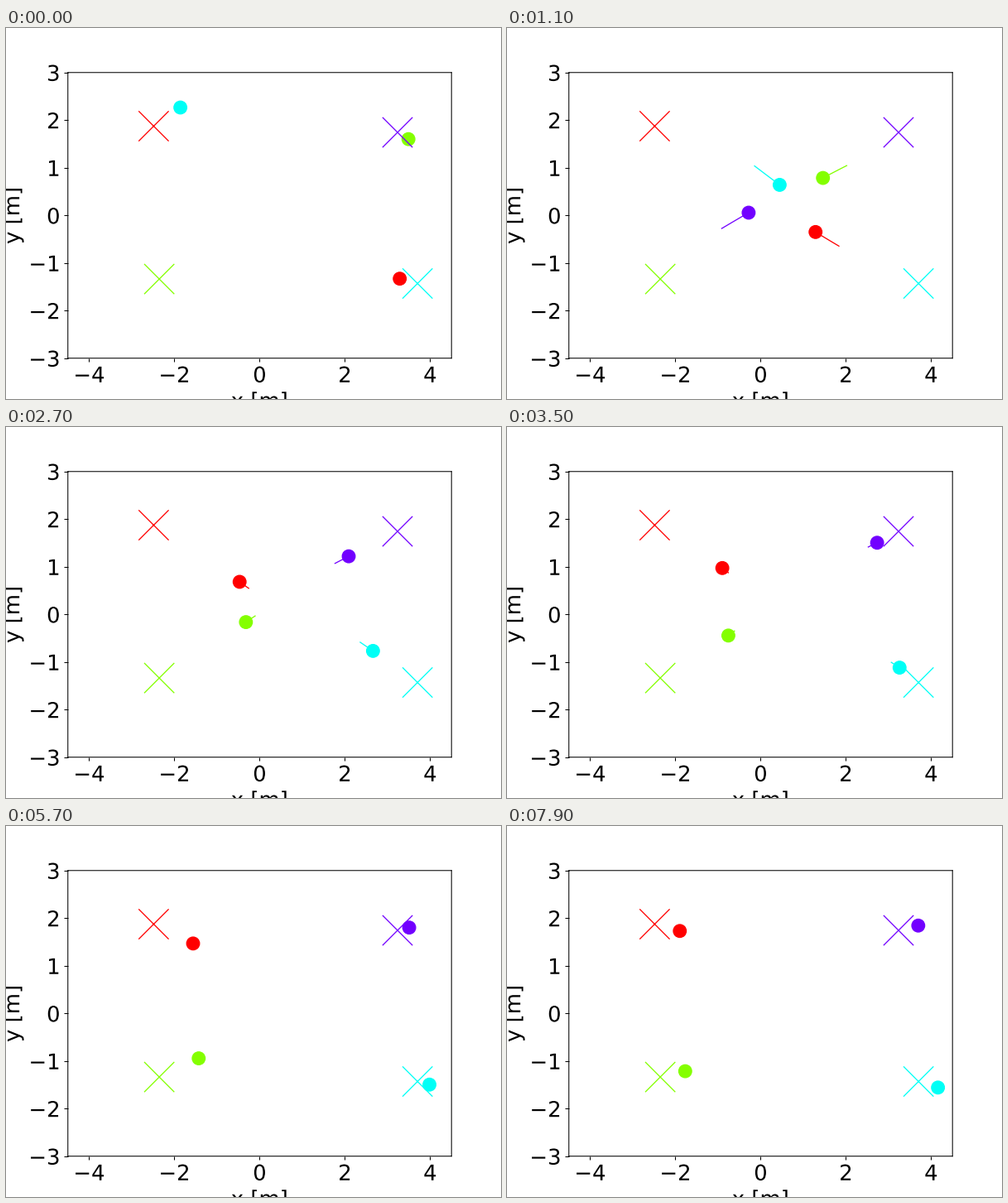
Write a matplotlib script that moves like this. It is 598 px wide and 448 px high and loops after 8000 ms.

```python
import numpy as np
import matplotlib.pyplot as plt
from matplotlib.animation import FuncAnimation
from matplotlib.path import Path
from matplotlib.patheffects import Normal

W, H, DPI = 598, 448, 93.4
FRAMES, STEP = 80, 100  # count, ms
TAIL = 3                # steps of history behind each agent

# A plain path effect draws text and markers as outlines, free of the pixel grid
plt.rcParams.update({"font.family": "DejaVu Sans", "font.size": 20,
                     "path.snap": False, "path.effects": [Normal()]})


def quick(t):
    """Share of the way still to go: a damped approach."""
    return (1 + 0.45 * t) * np.exp(-0.8 * t)


def slow(t):
    """The same with a long tail."""
    damped = (1 + 1.6 * t) * np.exp(-1.6 * t)
    return 0.64 * np.exp(-0.28 * t) + 0.36 * damped


# start, resting point, sideways swerve, approach, goal (all in metres)
AGENTS = [
    ((3.286, -1.330), (-2.288, 2.018), -0.348, slow, (-2.487, 1.874)),
    ((3.490, 1.601), (-2.167, -1.504), 0.470, slow, (-2.356, -1.337)),
    ((-1.861, 2.265), (4.209, -1.547), -0.278, quick, (3.703, -1.431)),
    ((-2.754, -1.313), (3.750, 1.827), 0.278, quick, (3.234, 1.743)),
]
CROSS = Path([(-1, -1), (1, 1), (-1, 1), (1, -1)],
             [Path.MOVETO, Path.LINETO] * 2)


def route(start, end, swerve, left, t):
    """Path from start to end that swerves to avoid the others."""
    x = end[0] + (start[0] - end[0]) * left(t)
    y = end[1] + (start[1] - end[1]) * left(t) + swerve * t * np.exp(-t / 2)
    return x, y


fig = plt.figure(figsize=((W + 1e-6) / DPI, (H + 1e-6) / DPI), dpi=DPI,
                 facecolor="white")
ax = fig.add_axes([0.125, 0.11, 0.775, 0.77])
ax.set(xlim=(-4.5, 4.5), ylim=(-3, 3), xlabel="x [m]", ylabel="y [m]",
       xticks=range(-4, 5, 2), yticks=range(-3, 4))

times = np.arange(FRAMES) * STEP / 1000
paths, tails, dots = [], [], []
for n, (start, end, swerve, left, goal) in enumerate(AGENTS):
    color = plt.cm.hsv(n / len(AGENTS))
    paths.append(route(start, end, swerve, left, times))
    tails += ax.plot([], [], color=color, lw=1, zorder=2)
    dots += ax.plot([], [], "o", color=color, ms=12, zorder=3)
    ax.plot(*goal, marker=CROSS, color=color, ms=28, mew=1, zorder=4)


def update(i):
    for (x, y), tail, dot in zip(paths, tails, dots):
        past = slice(max(0, i - TAIL), i + 1)
        tail.set_data(x[past], y[past])
        dot.set_data([x[i]], [y[i]])
    dots[-1].set_visible(i > 0)  # the last agent joins one step late
    return tails + dots


anim = FuncAnimation(fig, update, frames=FRAMES, interval=STEP,
                     repeat=True, repeat_delay=0, blit=False)
plt.show()
```
